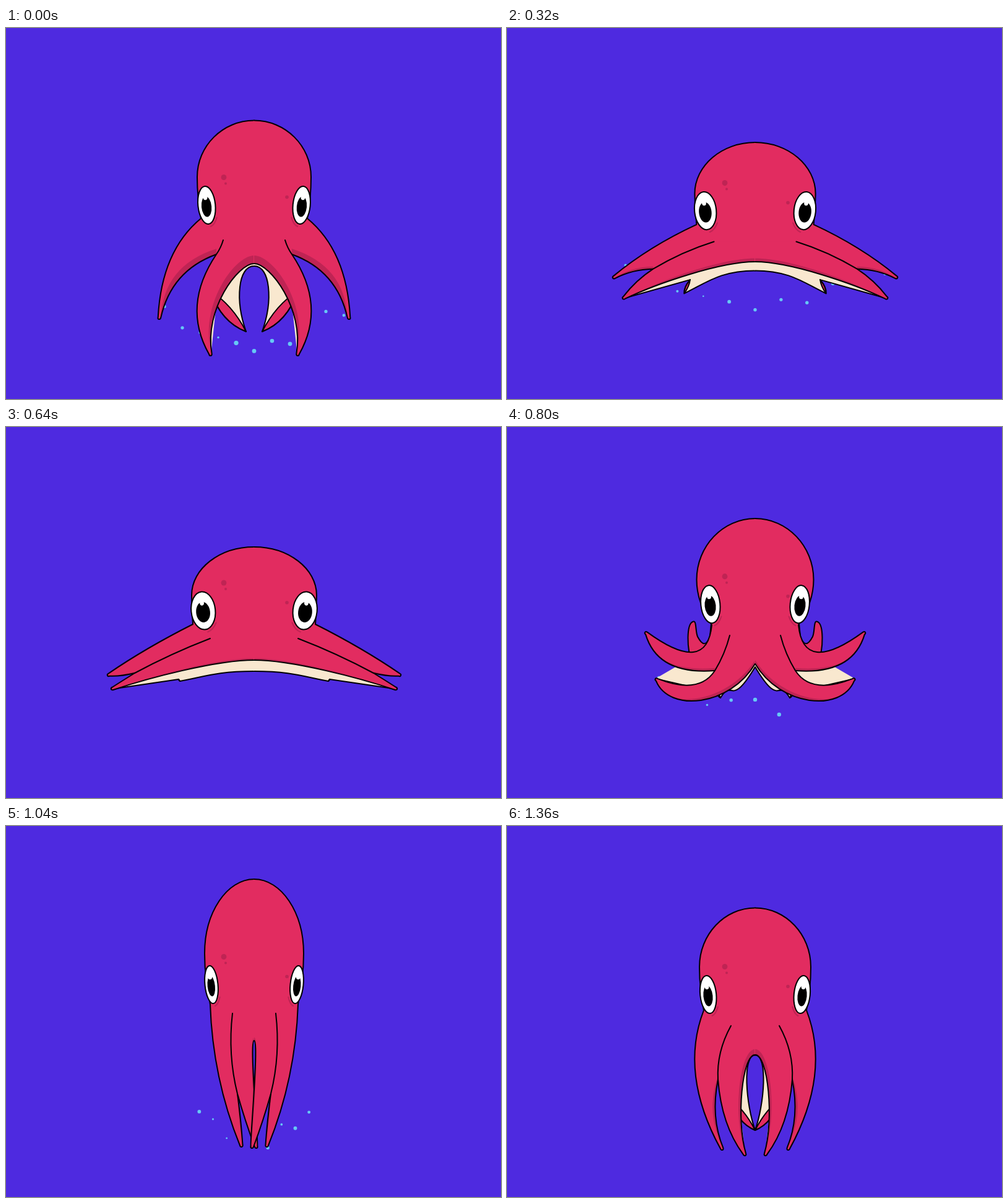
An HTML page with a canvas for the animation above (1440 ms loop, 800x600 px).

```html
<!DOCTYPE html>
<html lang="en">
<head>
<meta charset="utf-8">
<title>Swimming octopus</title>
<style>
html, body { margin: 0; height: 100%; overflow: hidden; background: #4e2ae0; }
canvas { display: block; }
</style>
</head>
<body>
<canvas id="stage" width="800" height="600"></canvas>
<script>
const ctx = document.getElementById('stage').getContext('2d');
const SEA = '#4e2ae0', SKIN = '#e22c60', SHADE = '#bf2454', CREAM = '#f9e8cf', BUBBLE = '#66c8f5';
const LOOP = 1440, STEP = 80, AXIS = 401;

// Key points of the left half; the right half is its mirror image.
// dome: top y, widest x, widest y; eye: x, y, radius; arch: crotch y, underside thickness, shade
const poses = [
  { time: 0, dome: [149.5, 309, 241], cheek: [315, 308], eye: [324.3, 286.5, 14],
    armOuter: [266, 374], armTip: [247, 471], armInner: [281, 405], armpit: [340, 366],
    crease: [351, 343], legOuter: [309, 448], legTip: [331, 530], legInner: [320, 455],
    bend: [375, 381], arch: [381, 4, 13],
    notch: [330, 425], backTip: [388, 491], backInner: [370, 440] },
  { time: 160, dome: [176, 306, 264], cheek: [310, 317], eye: [322.2, 294, 16],
    armOuter: [240, 356], armTip: [179, 406], armInner: [222, 391], armpit: [264, 382],
    crease: [339, 346], legOuter: [230, 412], legTip: [206, 448], legInner: [255, 421],
    bend: [350, 379], arch: [379, 11, 8],
    notch: [310, 407], backTip: [293, 447], backInner: [325, 420] },
  { time: 640, dome: [194, 300, 272], cheek: [302, 319], eye: [318.8, 297, 19.5],
    armOuter: [230, 358], armTip: [164, 402], armInner: [186, 402], armpit: [208, 398],
    crease: [330, 342], legOuter: [192, 408], legTip: [170, 424], legInner: [230, 406],
    bend: [340, 377], arch: [377, 18, 3],
    notch: [279, 408], backTip: [281, 411], backInner: [320, 404] },
  { time: 800, dome: [148, 306.5, 247], cheek: [331, 320], eye: [328.8, 286.7, 15.5],
    armOuter: [301, 364], armTip: [223, 332], armInner: [262, 383], armpit: [336, 394],
    crease: [360, 337], legOuter: [300, 417], legTip: [240, 407], legInner: [262, 462],
    bend: [360, 452], arch: [383, 5, 6],
    notch: [340, 430], backTip: [345, 438], backInner: [365, 405] },
  { time: 1040, dome: [86, 321, 206], cheek: [330, 288], eye: [332, 256.5, 10.5],
    armOuter: [344, 405], armTip: [381, 519], armInner: [379, 475], armpit: [374, 433],
    crease: [366, 303], legOuter: [387, 476], legTip: [405, 521], legInner: [408, 515],
    bend: [393, 347], arch: [347, -2, 5],
    notch: [384, 425], backTip: [392, 440], backInner: [392, 410] },
  { time: 1360, dome: [132.5, 311, 228], cheek: [318, 298], eye: [325.2, 272.5, 13],
    armOuter: [305, 405], armTip: [348, 524], armInner: [337, 468], armpit: [341, 410],
    crease: [362, 323], legOuter: [354, 477], legTip: [385, 533], legInner: [370, 475],
    bend: [380, 370], arch: [370, .5, 9],
    notch: [358, 440], backTip: [401, 492], backInner: [386, 450] }
];

const clamp = v => Math.max(0, Math.min(1, v));
const add = (p, q, k = 1) => [p[0] + q[0] * k, p[1] + q[1] * k];
const sub = (p, q) => add(p, q, -1);
const mix = (p, q) => [(p[0] + q[0]) / 2, (p[1] + q[1]) / 2];
const unit = v => add([0, 0], v, 1 / (Math.hypot(...v) || 1));
const random = n => (Math.sin(n * 127.1 + 3) * 43758.5 % 1 + 1) % 1;

const count = poses.length;
const wrap = i => (i + count) % count;
const span = i => (poses[wrap(i + 1)].time - poses[wrap(i)].time + LOOP) % LOOP;

// Monotone cubic through the looping key values
function tween(value, t) {
  const i = poses.findLastIndex(p => p.time <= t), h = span(i);
  const slope = j => (value(wrap(j + 1)) - value(wrap(j))) / span(j);
  const tangent = j => {
    const a = slope(j - 1), b = slope(j);
    return a * b > 0 ? 2 * a * b / (a + b) : 0;
  };
  const u = (t - poses[i].time) / h, v = 1 - u;
  return v * v * (1 + 2 * u) * value(i) + u * u * (3 - 2 * u) * value(wrap(i + 1))
    + h * u * v * (v * tangent(i) - u * tangent(i + 1));
}

function poseAt(t) {
  const pose = {};
  for (const [part, nums] of Object.entries(poses[0]))
    if (part !== 'time') pose[part] = nums.map((_, n) => tween(i => poses[i][part][n], t));
  return pose;
}

// Control point of the quadratic from a to b that passes through m
const through = (a, m, b) => sub(add(m, m), mix(a, b));

function bow(path, a, m, b) {
  path.lineTo(...a);
  path.quadraticCurveTo(...through(a, m, b), ...b);
}

// Outer edge and rounded tip of a tentacle; returns where the inner edge begins
function reach(path, root, outer, tip, inner) {
  const dir = unit(sub(tip, mix(outer, inner))), across = sub(outer, inner);
  const side = dir[0] * across[1] - dir[1] * across[0] > 0 ? 2.3 : -2.3;
  const normal = [-dir[1] * side, dir[0] * side], neck = add(tip, dir, -3);
  const end = sub(neck, normal);
  bow(path, root, outer, add(neck, normal));
  path.bezierCurveTo(...add(add(neck, normal), dir, 4), ...add(end, dir, 4), ...end);
  return end;
}

function shape(edge, corners, fill) {
  const area = new Path2D(edge);
  corners.forEach(c => area.lineTo(...c));
  ctx.fillStyle = fill;
  ctx.fill(area);
  return area;
}

function shadeInside(area, band) {
  ctx.save();
  ctx.clip(area);
  shape(band, [], SHADE);
  ctx.restore();
}

function drawBack({ legTip, crease, bend, arch: [crotch, gap], notch, backTip, backInner }) {
  const middle = mix(notch, backTip);
  const bulge = add([0, 0], unit(sub(middle, backInner)), .12 * Math.hypot(...sub(notch, backTip)));
  const outer = add(middle, bulge), stripe = add(middle, bulge, -.6);
  const edge = new Path2D();
  edge.lineTo(...legTip);
  bow(edge, notch, outer, backTip);
  edge.bezierCurveTo(...backInner, bend[0], bend[1] + gap, AXIS, crotch + gap);
  shape(edge, [[AXIS + 1, crotch + gap], [AXIS + 1, crotch - 40], crease], CREAM);
  const band = new Path2D();
  bow(band, notch, outer, backTip);
  bow(band, backTip, stripe, notch);
  shape(band, [], SKIN);
  ctx.stroke(band);
  ctx.stroke(edge);
}

// Rear tentacle flicking up behind the body
function drawFlick(size) {
  ctx.save();
  ctx.translate(325, 385);
  ctx.scale(size, size);
  const edge = new Path2D('M-25 0C-36-30-34-66-25-70C-18-74-21-55-17-46Q-5-23 3-47L5-67');
  shape(edge, [[15, -67], [15, 0]], SKIN);
  ctx.stroke(edge);
  ctx.restore();
}

function drawTorso({ dome: [top, x, y], cheek, armOuter, armTip, armInner, armpit, crease, arch }) {
  const round = .55, shade = arch[2] * .7;
  const edge = new Path2D();
  edge.moveTo(AXIS, top);
  edge.bezierCurveTo(AXIS - (AXIS - x) * round, top, x, y - (y - top) * round, x, y);
  edge.quadraticCurveTo(x, (y + cheek[1]) / 2, ...cheek);
  const start = reach(edge, cheek, armOuter, armTip, armInner);
  bow(edge, start, armInner, armpit);
  const torso = shape(edge, [[AXIS + 1, crease[1]], [AXIS + 1, top]], SKIN);

  const band = new Path2D();
  bow(band, start, armInner, armpit);
  bow(band, add(armpit, [0, -shade]), add(armInner, [-.7 * shade, -.7 * shade]), start);
  shadeInside(torso, band);
  ctx.stroke(edge);
}

function drawLeg({ crease, armpit, legOuter, legTip, legInner, bend, arch: [crotch, , shade] }) {
  const flow = unit(sub(through(armpit, legOuter, legTip), armpit));
  const length = Math.hypot(...sub(armpit, crease));
  const edge = new Path2D();
  edge.moveTo(...crease);
  edge.quadraticCurveTo(...add(armpit, flow, -length / 2), ...armpit);
  const start = reach(edge, armpit, legOuter, legTip, legInner);
  edge.bezierCurveTo(...legInner, ...bend, AXIS, crotch);
  const limb = shape(edge, [[AXIS + 1, crotch], [AXIS + 1, crease[1]]], SKIN);

  const band = new Path2D();
  band.moveTo(...start);
  band.bezierCurveTo(...legInner, ...bend, AXIS, crotch);
  band.lineTo(AXIS, crotch - shade);
  band.bezierCurveTo(...add(bend, [-.5, -1], shade), ...add(legInner, [-.7, -.3], shade), ...start);
  shadeInside(limb, band);
  ctx.stroke(edge);
}

function drawBody(pose) {
  drawTorso(pose);
  drawLeg(pose);
}

function oval(x, y, rx, ry, fill) {
  ctx.beginPath();
  ctx.ellipse(x, y, rx, ry, 0, 0, 7);
  ctx.fillStyle = fill;
  ctx.fill();
}

function drawEye({ eye: [x, y, r] }) {
  ctx.save();
  ctx.translate(x, y);
  ctx.rotate(-.1);
  ctx.beginPath();
  ctx.ellipse(0, 0, r + 4, 35.5, 0, .65, 1.4);
  ctx.strokeStyle = SHADE;
  ctx.stroke();
  oval(0, 0, r, 30.7, '#fff');
  ctx.strokeStyle = '#000';
  ctx.stroke();
  oval(-.5, 2.5, r * .58, 16.5, '#000');
  oval(-1, -12.5, 3.4, 4, '#fff');
  ctx.restore();
}

function drawSpots({ eye: [, y] }) {
  oval(352, y - 45, 4.4, 4.6, SHADE);
  oval(355, y - 35, 2, 2, SHADE);
  oval(454, y - 13, 2.8, 2.8, SHADE);
}

// A row of drops, lower in the middle, that spreads or gathers while it drifts
function drawBurst(age, life, { number, width, base, curve, spread, drift, seed }) {
  if (age < 0 || age > life) return;
  const ease = 1 - (1 - age / life) ** 2, fade = clamp((life - age) / 200);
  for (let i = 0; i < number; i++) {
    const u = 2 * i / (number - 1) - 1;
    const x = AXIS + u * width * (1 + spread * ease);
    const y = base - curve * u * u + (random(i + seed) - .5) * 30 + drift * ease;
    const r = (1.5 + 2.3 * random(i * 3 + seed)) * fade;
    oval(x, y, r, r, BUBBLE);
  }
}

function both(draw, arg) {
  draw(arg);
  ctx.save();
  ctx.translate(2 * AXIS, 0);
  ctx.scale(-1, 1);
  draw(arg);
  ctx.restore();
}

function render(now) {
  const t = Math.floor(now % LOOP / STEP) * STEP, pose = poseAt(t);
  ctx.fillStyle = SEA;
  ctx.fillRect(0, 0, 800, 600);
  ctx.lineWidth = 2;
  ctx.lineJoin = ctx.lineCap = 'round';
  ctx.strokeStyle = '#000';
  drawBurst(t, 480, { number: 11, width: 145, base: 510, curve: 60, spread: .5, drift: -75, seed: 4 });
  drawBurst(t - 720, 480, { number: 9, width: 190, base: 425, curve: 60, spread: -.6, drift: 95, seed: 9 });
  const lift = 1 - Math.abs(t - 800) / 160;
  if (lift > 0) both(drawFlick, lift);
  both(drawBack, pose);
  both(drawBody, pose);
  drawSpots(pose);
  both(drawEye, pose);
}

const begin = performance.now();
function loop() {
  render(performance.now() - begin);
  requestAnimationFrame(loop);
}
loop();
</script>
</body>
</html>
```
